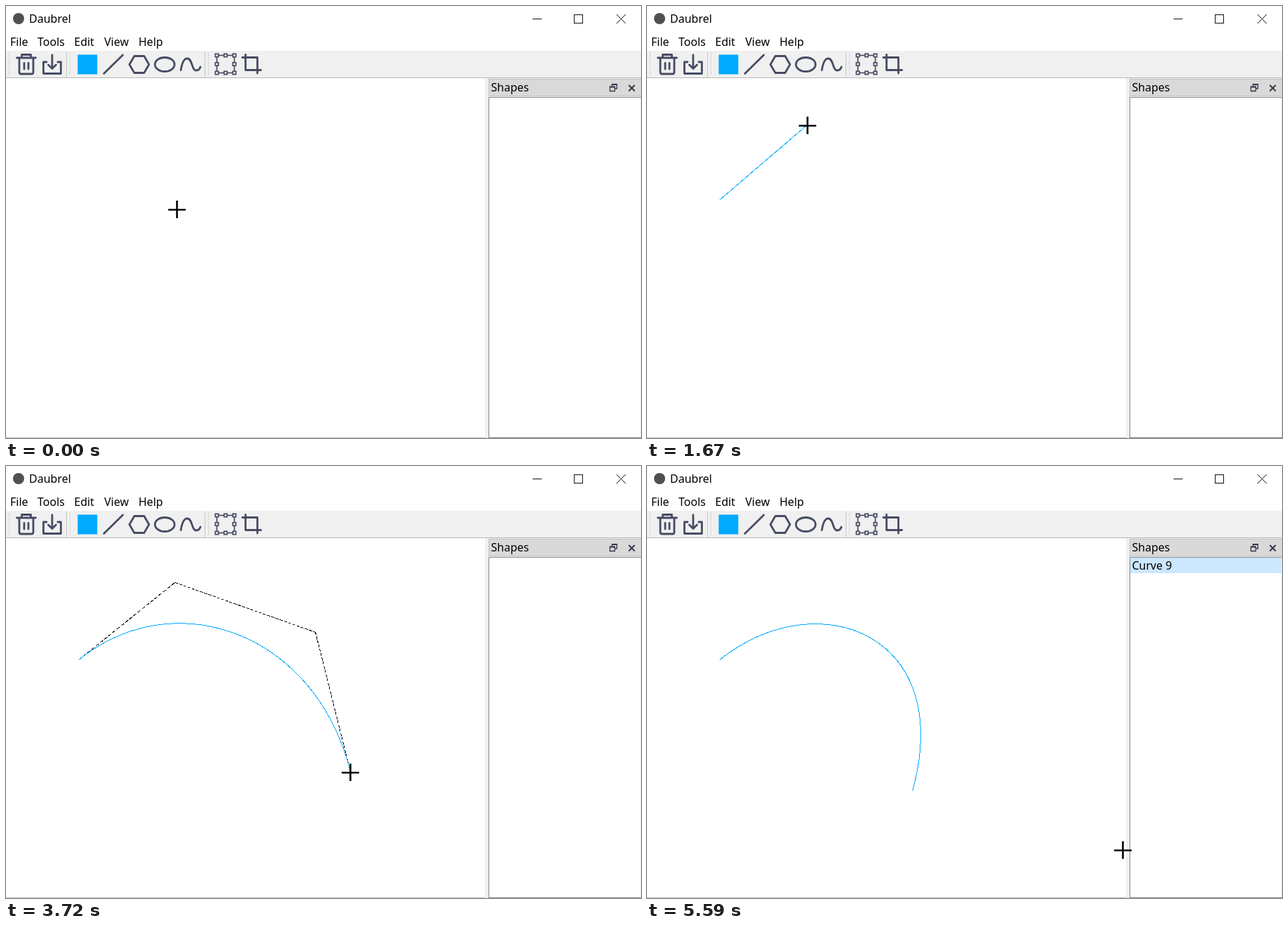
Animation of 908x617 px, one loop 6000 ms. Source, as an HTML page:

```html
<!DOCTYPE html>
<html lang="en">
<head>
<meta charset="utf-8">
<title>Daubrel</title>
<style>
  html, body { margin: 0; width: 100%; height: 100%; overflow: hidden; background: #fff; }
  svg { display: block; width: 908px; height: 617px; }
  text { font: 16px "Noto Sans", "Open Sans", sans-serif; fill: #000; }
  .icon { fill: none; stroke: #474c63; stroke-width: 2.8; stroke-linecap: round; stroke-linejoin: round; }
  .crisp { fill: none; shape-rendering: crispEdges; stroke-width: 1; }
  .grip { stroke: #aaa; stroke-width: 1; stroke-dasharray: 1 2; }
  .sep { stroke: #c6c6c6; }
  #guide { stroke: #000; stroke-dasharray: 4 2; }
</style>
</head>
<body>
<svg viewBox="0 0 908 617">
  <rect width="908" height="617" fill="#fff"/>

  <!-- title bar and menu -->
  <circle cx="18" cy="18" r="8" fill="#505050"/>
  <text x="33" y="24">Daubrel</text>
  <g fill="none" stroke="#111">
    <path d="M753 18.5h13M812.5 12.5h12v12h-12z" shape-rendering="crispEdges"/>
    <path d="M873 12l13 13M886 12l-13 13"/>
  </g>
  <g>
    <text x="6" y="56.500">File</text>
    <text x="45" y="56.500">Tools</text>
    <text x="97.500" y="56.500">Edit</text>
    <text x="140.500" y="56.500">View</text>
    <text x="189.500" y="56.500">Help</text>
  </g>

  <!-- toolbar -->
  <rect y="64" width="908" height="39" fill="#f0f0f0"/>
  <path class="crisp" d="M0 102.500H908" stroke="#b8b8b8"/>
  <path class="crisp grip" d="M4.500 67V100M91.500 67V100M289.500 67V100"/>
  <path class="crisp sep" d="M86.500 65V102M284.500 65V102"/>
  <rect id="hover" x="246.500" y="65.500" width="36" height="36" stroke="#99d1ff"/>
  <g class="icon">
    <path d="M15.500 74H42.500M22.500 73.500V69.500H35.500V73.500M19 75V94.500Q19 97 21.500 97H36.500Q39 97 39 94.500V75M26 81.500V90M32 81.500V90"/>
    <path d="M58 80H53.500V96.500H78.500V80H74M66 70V89M60.500 84L66 89.500L71.500 84"/>
    <path d="M140 96.500L167 70"/>
    <path d="M176.500 83.500L183.500 71.500H197.500L204.500 83.500L197.500 95.500H183.500Z"/>
    <ellipse cx="227" cy="83.500" rx="14" ry="10"/>
    <path d="M250 91.500C251.500 82 254 75 259 75C267 75 265 92 272 92C275 92 277 90 278 87"/>
    <path d="M342.500 69.500V91.500H364.500M338 73.500H359.500V96"/>
  </g>
  <rect x="102.500" y="69.500" width="28" height="28" fill="#00aaff"/>
  <g id="handles" fill="#f0f0f0" stroke="#474c63" stroke-width="1.700">
    <rect x="301.500" y="70.500" width="25" height="25" fill="none"/>
  </g>

  <!-- shapes dock -->
  <rect x="685" y="103" width="223" height="514" fill="#f0f0f0"/>
  <rect x="690.500" y="104.500" width="222" height="24" fill="#d9d9d9" stroke="#c2c2c2"/>
  <text x="693.500" y="122">Shapes</text>
  <g fill="none" stroke="#34384a">
    <path d="M866.500 114V112H873.500V118H871M863.500 115.500H870.500V121.500H863.500Z" stroke-width="1.300"/>
    <path d="M863 115.500H871M866 112H874M890.500 113L899 121.500M899 113L890.500 121.500" stroke-width="2"/>
  </g>
  <rect x="691" y="130" width="216" height="486" fill="#fff"/>
  <path class="crisp" d="M908 130.500H690.500V616.500H908" stroke="#828790"/>
  <path class="crisp" d="M0 616.500H685" stroke="#c0c0c0"/>
  <g id="item">
    <rect x="691" y="131" width="216" height="22" fill="#cce8ff"/>
    <text x="693.500" y="148">Curve 9</text>
  </g>

  <!-- drawing -->
  <g transform="translate(.5 .5)">
    <g id="guide" class="crisp"></g>
    <path id="curve" class="crisp" stroke="#00aaff"/>
  </g>
  <path id="cross" d="M-12 1H13M.5 -12V13" stroke="#000" stroke-width="2.600"/>
  <path id="arrow" d="M.5 .5V17L4.500 13.500L7.200 19.500L9.700 18.400L7 12.500H12.500Z" fill="#fff" stroke="#000"/>
</svg>
<script>
const LOOP = 6000;
const el = id => document.getElementById(id);
const show = (id, on) => el(id).style.display = on ? '' : 'none';

function add(parent, name, attrs = {}) {
  const node = document.createElementNS('http://www.w3.org/2000/svg', name);
  set(node, attrs);
  return el(parent).appendChild(node);
}

function set(node, attrs) {
  for (const [k, v] of Object.entries(attrs)) node.setAttribute(k, v);
}

for (const x of [301.5, 314, 326.5]) for (const y of [70.5, 83, 95.5]) {
  if (x !== 314 || y !== 83) add('handles', 'rect', { x: x - 2.2, y: y - 2.2, width: 4.4, height: 4.4 });
}

// Pointer moves: time of first and last step, step count, destination.
// "bend" curves the way there, "tip" is where the shape lags behind at the end.
const home = [244, 290];
const moves = [
  { t: [140, 510], n: 6, to: [266, 88], bend: [356, 190] },
  { t: [720, 1050], n: 6, to: [114, 260] },
  { t: [1140, 1210], n: 2, to: [104, 277] },
  { t: [1370, 1670], n: 5, to: [229, 170] },
  { t: [1760, 1830], n: 2, to: [241, 167] },
  { t: [2060, 2610], n: 8, to: [394, 214] },
  { t: [2700, 2760], n: 2, to: [442, 238] },
  { t: [3100, 3340], n: 4, to: [550, 325], tip: [549, 322] },
  { t: [3410, 3630], n: 4, to: [524, 409], bend: [554, 365] },
  { t: [3720, 4040], n: 5, to: [402, 470], tip: [404, 466], bend: [470, 466] },
  { t: [4110, 4190], n: 2, to: [379, 465] },
  { t: [5210, 5210], n: 1, to: [560, 556] },
  { t: [5300, 5300], n: 1, to: [684, 554] },
  { t: [5590, 5590], n: 1, to: [680, 548] },
];
const clicks = [[1370, 104, 276], [2060, 241, 166], [3100, 442, 237], [4420, 379, 464]];
const FINISH = 4830;
const guides = clicks.map(() => add('guide', 'line'));

const mix = (a, b, u) => a.map((v, i) => v + (b[i] - v) * u);

function pointerAt(time) {
  let pos = home, tip = null;
  for (const { t: [start, end], n, to, bend, tip: lag } of moves) {
    if (time < start) break;
    const span = end - start;
    const step = span ? Math.min(n, Math.floor((time - start) / span * (n - 1) + 1e-6) + 1) : 1;
    const u = 1 - (1 - step / n) ** 1.5;
    const mid = bend || mix(pos, to, .5);
    pos = mix(mix(pos, mid, u), mix(mid, to, u), u).map(Math.round);
    tip = step === n && lag ? lag : [pos[0], pos[1] - 1];
  }
  return { pos, tip };
}

function bezier(points, u) {
  while (points.length > 1) points = points.slice(1).map((p, i) => mix(points[i], p, u));
  return points[0];
}

const toPath = points => points.length ? 'M' + points.map(p => p.map(v => v.toFixed(2))).join('L') : '';

// Dashes count pixels along the longer axis of each line.
function drawGuides(points) {
  guides.forEach((line, i) => {
    const [a, b] = [points[i], points[i + 1]];
    line.style.display = b ? '' : 'none';
    if (!b) return;
    const steps = Math.max(Math.abs(b[0] - a[0]), Math.abs(b[1] - a[1]));
    set(line, { x1: a[0], y1: a[1], x2: b[0], y2: b[1], pathLength: steps || 1 });
  });
}

function draw(time) {
  const { pos, tip } = pointerAt(time);
  const done = time >= FINISH;
  const points = clicks.filter(c => time >= c[0]).map(c => c.slice(1));
  if (points.length && !done) points.push(tip);
  const line = points.length ? Array.from({ length: 81 }, (_, i) => bezier(points, i / 80)) : [];
  drawGuides(done ? [] : points);
  set(el('curve'), { d: toPath(line) });

  const inBar = pos[1] < 103;
  for (const id of ['cross', 'arrow']) set(el(id), { transform: `translate(${pos})` });
  show('cross', !inBar);
  show('arrow', inBar);
  show('hover', inBar && pos[0] > 246 && pos[0] < 283);
  set(el('hover'), { fill: time >= 650 ? '#cce8ff' : '#e5f3ff' });
  show('item', done);
}

function tick() {
  draw(performance.now() % LOOP);
  requestAnimationFrame(tick);
}
tick();
</script>
</body>
</html>
```
